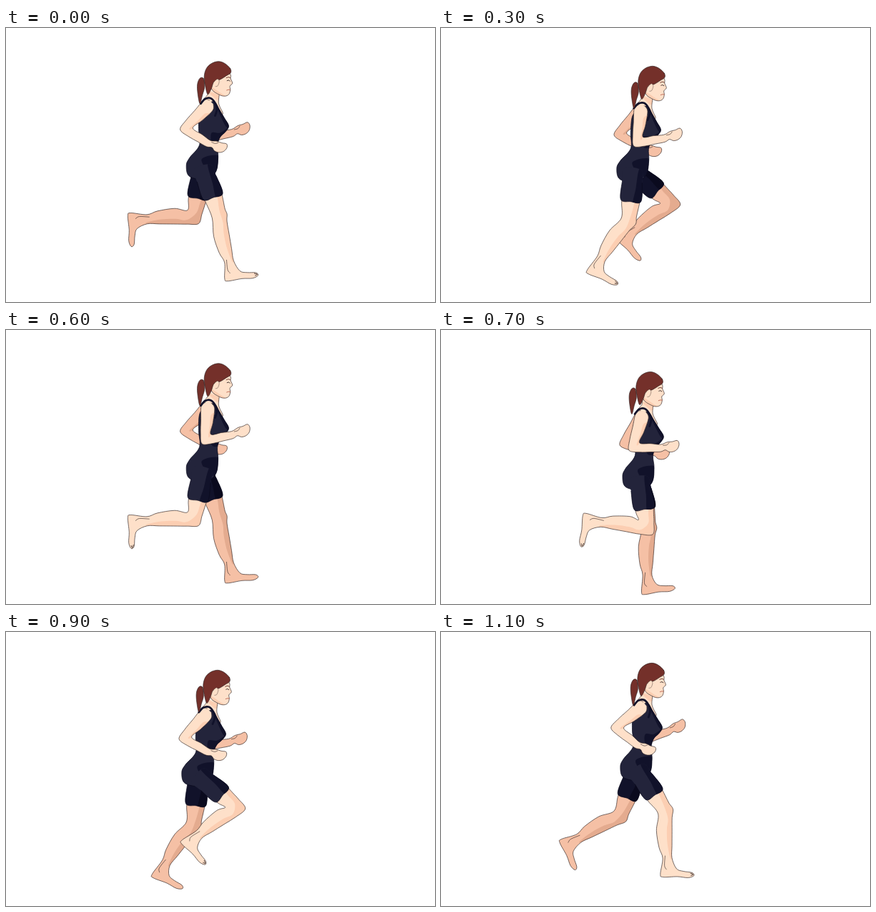
Write an HTML page with a canvas that moves like this. It is 600 px wide and 383 px high and loops after 1.2 s.

```html
<!DOCTYPE html>
<html lang="en">
<head>
<meta charset="utf-8">
<title>Running cycle</title>
<style>
html, body { margin: 0; width: 100%; height: 100%; overflow: hidden; background: #fff; }
canvas { display: block; width: 600px; height: 383px; }
</style>
</head>
<body>
<canvas id="stage"></canvas>
<script>
const STEP = 100, STEPS = 12, TURN = 2 * Math.PI;
const INK = '#2b2020', NAVY = '#23243b', DARK = '#11122a', HAIR = '#74302a';
const NEAR = { skin: '#fee0c9', shade: '#fcceb2', cloth: NAVY, panel: DARK };
const FAR = { skin: '#f5c0a5', shade: '#e4ab8f', cloth: DARK, panel: '#0a0a1e' };

const canvas = document.getElementById('stage');
const ratio = window.devicePixelRatio || 1;
canvas.width = 600 * ratio;
canvas.height = 383 * ratio;
const ctx = canvas.getContext('2d');
ctx.scale(ratio, ratio);
ctx.lineJoin = ctx.lineCap = 'round';

// Periodic motion: a mean plus cosine and sine parts of each harmonic
const wave = (a, mean, ...parts) => parts.reduce((sum, p, i) => {
  const x = a * (1 + (i >> 1));
  return sum + p * (i % 2 ? Math.sin(x) : Math.cos(x));
}, mean);

// Point at a distance; degrees count from straight down, forward positive
const reach = ([x, y], deg, d) => {
  const r = deg * Math.PI / 180;
  return [x + d * Math.sin(r), y + d * Math.cos(r)];
};

// The body bobs twice per stride
function sway(a) {
  const lift = wave(2 * a, 5.7, -3.3, 8.1, -1.7, 0.6);
  return {
    head: [wave(2 * a, -3.5, 0.7, -1.2, 2), lift],
    chest: [wave(2 * a, -2.8, 1.2, -0.3, 0.9, 0.9), lift],
    hip: [wave(2 * a, -2.3, 3.2, 0.9, -1.2, 0.9), wave(2 * a, 4.5, -2, 8.1, -2, 1.2)]
  };
}

// Smooth curve through points
function curve(pts, closed) {
  const n = pts.length, p = new Path2D();
  const at = i => closed ? pts[(i + n) % n] : pts[Math.max(0, Math.min(n - 1, i))];
  p.moveTo(...pts[0]);
  for (let i = 0; i < (closed ? n : n - 1); i++) {
    const [a, b, c, d] = [at(i - 1), at(i), at(i + 1), at(i + 2)];
    p.bezierCurveTo(
      b[0] + (c[0] - a[0]) / 6, b[1] + (c[1] - a[1]) / 6,
      c[0] - (d[0] - b[0]) / 6, c[1] - (d[1] - b[1]) / 6, c[0], c[1]);
  }
  if (closed) p.closePath();
  return p;
}

function fill(path, color) {
  ctx.fillStyle = color;
  ctx.fill(path);
}

function line(path, width = 0.65, color = INK) {
  ctx.lineWidth = width;
  ctx.strokeStyle = color;
  ctx.stroke(path);
}

function shaded(path, color, shade, shadeColor) {
  fill(path, color);
  ctx.save();
  ctx.clip(path);
  fill(shade, shadeColor);
  ctx.restore();
}

// Local frame of a bone: u runs along it, v points to its front side
function bone(a, b) {
  const dx = b[0] - a[0], dy = b[1] - a[1], d = Math.hypot(dx, dy);
  const [x, y] = [dx / d, dy / d];
  return { n: [y, -x], at: (u, v) => [a[0] + x * u + y * v, a[1] + y * u - x * v] };
}

// Round outer and mitred inner corner where two bones meet
function joint([px, py], m, n) {
  const x = m[0] + n[0], y = m[1] + n[1], d = Math.hypot(x, y) || 1;
  const round = r => [px + x / d * r, py + y / d * r];
  return { round, miter: r => round(r / Math.max(d / 2, 0.5)) };
}

const each = (at, list) => list.map(p => at(...p));
const side = (at, stops, width) => stops.map(u => at(u, width(u)));

const thighWidth = u => 17.5 - 0.11 * u;
const shinWidth = u => 9.2 - 0.042 * u;
const calfWidth = u => 13.7 - (u - 26) ** 2 / 210;
const upperWidth = u => 9.4 - 0.045 * u;
const foreWidth = u => 7.2 - 0.055 * u;

function leg(hip, a, tone) {
  const knee = reach(hip, wave(a, 12.1, 16.1, -27.1, -9, 1.7, -1.3, 0.6), 71);
  const ankle = reach(knee, wave(a, -41.9, 46.2, 11.8, 3.9, -11.6, 3.8, 2), 73);
  const toes = reach(ankle, 90 - wave(a, 40.3, -48.5, -14, 2.8, 6.9, 1.3, -3.3), 38);
  const thigh = bone(hip, knee), shin = bone(knee, ankle), foot = bone(ankle, toes);
  const bend = joint(knee, thigh.n, shin.n);

  const front = [
    ...side(thigh.at, [38, 52, 64], thighWidth),
    bend.round(11),
    ...side(shin.at, [9, 28, 48, 65], shinWidth)
  ];
  const outline = curve([
    ...front,
    ...each(foot.at, [[13, -6], [23, -9], [35, -10], [38, -14], [30, -17.5], [15, -17], [-5, -19], [-9, -15]]),
    ...side(shin.at, [65, 50, 26], u => -calfWidth(u)),
    bend.miter(-10.5),
    ...side(thigh.at, [48, 38], u => -thighWidth(u))
  ]);
  const inner = [
    ...side(shin.at, [65, 45, 25, 10], u => 0.5 + (u - 35) ** 2 / 250),
    ...side(thigh.at, [64, 50, 38], u => 13 - u / 6)
  ];
  shaded(outline, tone.skin, curve([...front, ...inner]), tone.shade);
  line(outline);
  line(curve([shin.at(62, -3), foot.at(-4, -3), foot.at(-1, -8)]), 0.6);
  if (tone === NEAR) line(curve(each(foot.at, [[33, -11], [37, -12.5], [34, -14]])), 0.9);

  const hem = each(thigh.at, [[16, 13], [42, 14.2], [43.5, 0], [42, -14.2], [16, -15]]);
  const sleeve = curve([thigh.at(-2, 10), ...hem, thigh.at(-2, -14)], true);
  const panel = curve(each(thigh.at, [[-4, 7], [24, 5], [50, 4], [50, 22], [0, 18]]), true);
  shaded(sleeve, tone.cloth, panel, tone.panel);
  line(curve(hem), 0.7, '#08081a');
}

function arm(shoulder, a, tone) {
  const swing = Math.cos(a - 4.6 * TURN / STEPS);
  const elbow = reach(shoulder, -24 + 27 * swing, 45);
  const wrist = reach(elbow, 79 + 29 * swing, 42);
  const upper = bone(shoulder, elbow), fore = bone(elbow, wrist);
  const fist = bone(wrist, reach(wrist, 104 + 24 * swing, 22));
  const bend = joint(elbow, upper.n, fore.n);
  const knuckles = [200, 235, 270, 305, 345].map(deg => {
    const r = deg * Math.PI / 180;
    return fist.at(12 + 11 * Math.cos(r), 9.5 * Math.sin(r));
  });
  const outline = curve([
    upper.at(-7, -4),
    ...side(upper.at, [-2, 18, 36], u => -upperWidth(u)),
    bend.round(-7.5),
    ...side(fore.at, [9, 24, 38], u => -foreWidth(u)),
    ...knuckles,
    ...each(fist.at, [[22, 3], [15, 4], [8, 6]]),
    ...side(fore.at, [38, 24], foreWidth),
    bend.miter(6.5),
    ...side(upper.at, [20, 0], upperWidth),
    upper.at(-7, 4)
  ]);
  const shade = curve([upper.at(8, 12), bend.miter(7), bend.miter(3.5), upper.at(24, 4.5), upper.at(10, 5)], true);
  shaded(outline, tone.skin, shade, tone.shade);
  line(outline);
  line(curve(each(fist.at, [[1, 4], [6, 2.5], [10, 4]])), 0.6);
}

function torso(warp) {
  const path = (list, closed = true) => curve(each(warp, list), closed);
  const neck = path([[283, 84], [283, 92], [276, 101], [280, 112], [298, 120], [304, 119],
    [300, 110], [298, 103], [299, 92]], false);
  shaded(neck, NEAR.skin, path([[284, 88], [300, 94], [297, 100], [290, 95]]), NEAR.shade);
  line(neck);

  const suit = path([[285, 104], [293, 103], [299, 113], [306, 125], [312, 136], [308, 144],
    [300, 152], [296, 164], [297, 180], [294, 200], [280, 211], [257, 207],
    [252.5, 192], [257, 181], [271, 163], [270, 140], [272, 115]]);
  const neckline = path([[292, 100], [297, 114], [308, 137], [314, 138], [298, 106]]);
  shaded(suit, NAVY, neckline, DARK);
  shaded(suit, 'transparent', path([[288, 146], [300, 146], [311, 139], [301, 153], [296, 162], [288, 160]]), DARK);
  shaded(suit, 'transparent', path([[274, 183], [298, 178], [299, 200], [286, 202]]), DARK);
  line(suit, 0.7, '#08081a');
}

function head(offset) {
  ctx.save();
  ctx.translate(...offset);
  const tail = curve([[277, 70], [272, 69.5], [268.5, 78], [269, 91], [272, 105], [275.5, 93], [278.5, 82]], true);
  fill(tail, HAIR);
  line(tail);

  const face = curve([[311, 57], [315, 65], [315, 70], [317.5, 76.5], [314, 80.5], [314.5, 86],
    [312.5, 92], [307, 94.5], [299, 92.5], [288, 84], [288, 66]]);
  shaded(face, NEAR.skin, curve([[288, 82], [301, 90], [308, 95], [290, 92]], true), NEAR.shade);
  line(face);

  const hair = curve([[314.5, 56], [307, 49], [298, 46], [288, 49], [281, 56], [278, 67], [279.5, 80], [283, 92],
    [288, 84], [292, 74], [301, 71], [309, 66], [315, 62]], true);
  fill(hair, HAIR);
  line(hair);

  const ear = curve([[293, 73], [297, 70.5], [299, 74], [297, 80], [294, 81]]);
  fill(ear, NEAR.skin);
  line(ear, 0.4);
  line(curve([[309, 69], [312, 68], [314.5, 69]]), 0.9, '#5a2a20');
  line(curve([[310, 73], [312, 72.3], [314, 73.5]]), 0.9);
  line(curve([[309.5, 86.3], [312, 85.5], [314.5, 85.7]]), 0.9, '#b8604f');
  ctx.restore();
}

function draw(step) {
  const a = step * TURN / STEPS, half = a + TURN / 2;
  const { head: tilt, chest, hip } = sway(a);
  const warp = (x, y) => {
    const k = Math.max(0, Math.min(1, (y - 100) / 90));
    return [x + chest[0] + (hip[0] - chest[0]) * k, y + chest[1] + (hip[1] - chest[1]) * k];
  };
  const pelvis = warp(277, 195), shoulder = warp(283, 108);

  ctx.fillStyle = '#fff';
  ctx.fillRect(0, 0, 600, 383);
  arm(shoulder, half, FAR);
  leg(pelvis, half, FAR);
  torso(warp);
  leg(pelvis, a, NEAR);
  arm(shoulder, a, NEAR);
  line(curve(each(warp, [[273, 105], [279, 98.5], [287, 97.5], [293, 104], [295.5, 113], [293, 122]])), 2.8, DARK);
  head(tilt);
}

let shown = -1;
function tick() {
  const step = Math.floor(performance.now() / STEP) % STEPS;
  if (step !== shown) draw(shown = step);
  requestAnimationFrame(tick);
}
tick();
</script>
</body>
</html>
```
